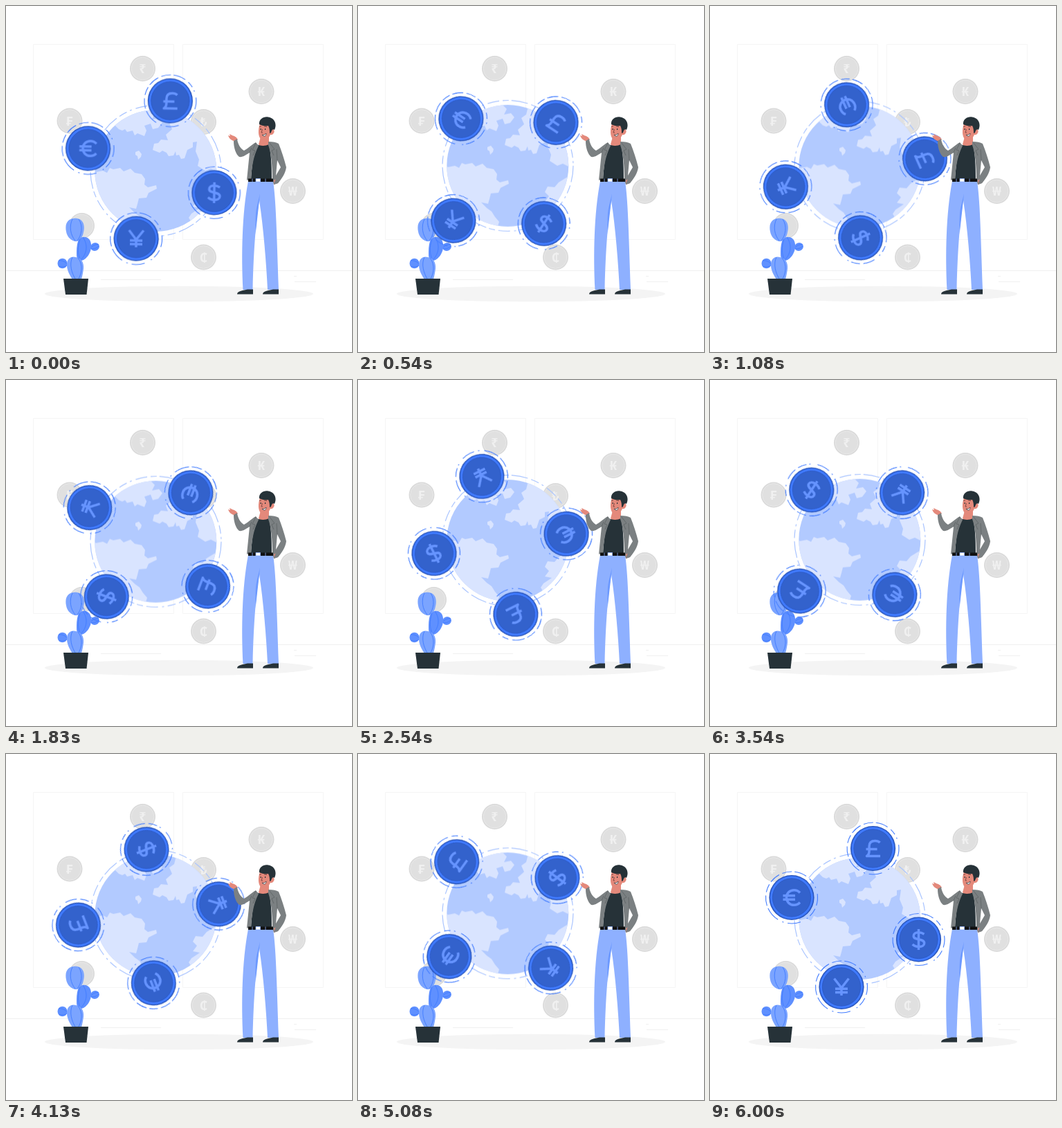
An HTML page without scripts for the animation above (6.04 s loop, 500 by 500 pixels).

```html
<!DOCTYPE html>
<html lang="en">
<head>
<meta charset="utf-8">
<title>World currencies</title>
<style>
  html, body { margin: 0; width: 100%; height: 100%; overflow: hidden; background: #fff; }
  svg { display: block; width: 100%; height: 100%; }
  .orbit { transform-origin: 207.8px 236.6px; animation: orbit 6040ms linear infinite; }
  .globe { animation: bob 6040ms linear infinite; }
  @keyframes orbit {
    0% { transform: rotate(1deg); }
    84.106% { transform: rotate(305.6deg); }
    99.338% { transform: rotate(360deg); }
    100% { transform: rotate(361deg); }
  }
  @keyframes bob {
    0%, 24.834%, 49.669%, 74.503%, 99.338%, 100% { transform: translateY(0); }
    12.417%, 37.252%, 62.086%, 86.921% { transform: translateY(-10px); }
  }
  .room { fill: none; stroke: #f5f5f5; }
  .gray text { font: 700 18px "Noto Sans", "DejaVu Sans", sans-serif; fill: #f0f0f0; text-anchor: middle; }
  .sign { fill: none; stroke: #6694ff; stroke-width: 3.5; stroke-linejoin: round; }
  .ink { fill: #263238; }
  .skin { fill: #e4897b; }
  .cloth { fill: #7b8082; }
  .fold { fill: none; stroke: #5e6465; stroke-width: .8; }
  .vein { fill: none; stroke: #407bff; stroke-width: .9; }
  .pale { fill: #7ba4ff; }
  .deep { fill: #5f90ff; }
</style>
</head>
<body>
<svg viewBox="0 0 500 500" xmlns="http://www.w3.org/2000/svg">
  <defs>
    <clipPath id="disc"><circle cx="216.3" cy="238" r="88"/></clipPath>
    <g id="coin">
      <circle r="32.6" fill="#2855bd"/>
      <circle r="31" fill="#407bff"/>
      <circle r="27.6" fill="#3362cc" stroke="#2c59c4"/>
      <circle r="37.5" fill="none" stroke="#407bff" stroke-width="1.1"
        stroke-dasharray="2 9 17 5 13 4 2 10 19 6 2 7 22 4 15 5 12 4 16 5 14 4 18 6 9 5.6" transform="rotate(-25)"/>
    </g>
    <g id="dull">
      <circle r="18.5" fill="#dadada"/>
      <circle r="16.4" fill="#e0e0e0" stroke="#e9e9e9"/>
    </g>
  </defs>

  <g class="room">
    <path d="M39.5 55.500H242.500V337.500H39.500ZM255.500 55.500H458.500V337.500H255.500Z"/>
    <path d="M0 382.500H500M137 395.500H224M416 390.500H420M417 398.500H448" stroke="#f0f0f0"/>
  </g>
  <ellipse cx="250" cy="416" rx="194" ry="11.300" fill="#f4f4f4"/>

  <g class="gray">
    <g transform="translate(197.500 90.500)"><use href="#dull"/><text y="6.500">₹</text></g>
    <g transform="translate(369 123.500)"><use href="#dull"/><text y="6.500">₭</text></g>
    <g transform="translate(92 166)"><use href="#dull"/><text y="6.500">₣</text></g>
    <g transform="translate(285.500 167.500)"><use href="#dull"/><text y="6.500">₺</text></g>
    <g transform="translate(414.500 267.500)"><use href="#dull"/><text y="6.500">₩</text></g>
    <g transform="translate(285.500 363)"><use href="#dull"/><text y="6.500">₵</text></g>
    <use href="#dull" x="109.500" y="317.500"/>
  </g>

  <g class="globe">
    <circle cx="216.500" cy="238" r="94.500" fill="none" stroke="#a9c4ff" stroke-width="1.200"
      stroke-dasharray="24 5 12 5 3 6 17 5 9 4"/>
    <circle cx="216.300" cy="238" r="88" fill="#b2caff"/>
    <g fill="#d9e4ff" clip-path="url(#disc)">
      <path d="M163 178 168 180 172 178 175 182 183 180 186 187 190 184 195 186 200 188 203 180 200 173 209 170 212 178 220 176 226 168 221 162 211 164 215 156 209 150 190 140 150 165Z"/>
      <path d="M247 148 243 164 236 169 240 178 231 186 234 194 224 193 220 198 214 199 212 208 222 212 226 209 232 212 235 217 242 216 245 210 246 216 250 215 253 221 258 220 262 208 270 204 270 197 276 196 274 210 279 222 277 231 288 238 296 235 310 242V148Z"/>
      <path d="M120 233 130 240 140 238 146 241 150 234 155 236 165 234 170 239 180 235 186 241 196 243 201 250 200 258 205 262 217 259 218 264 206 270 203 277 192 278 190 286 188 293 178 291 186 299 193 304 198 312 204 319 200 332H120Z"/>
      <path d="m187 211 5-2 4 5-1 4-4 4-1-5-3-2Z"/>
      <path d="M310 250 298 257 290 262 284 269 274 268 270 276 276 282 270 290 280 292 268 300 264 306 272 318 312 290Z"/>
    </g>
  </g>

  <g>
    <path class="pale" d="M87 326C84 312 92 305 103 307C113 309 114 319 112 327C110 337 105 341 99 340C93 338 88 333 87 326Z"/>
    <path class="vein" d="M96 308C91 318 93 331 100 339M105 308C112 318 109 332 103 339"/>
    <ellipse class="deep" cx="128.500" cy="348" rx="6.500" ry="5.800" transform="rotate(-20 128.500 348)"/>
    <path class="vein" d="M122 350C126 345 131 344 134 345M122 350C127 352 131 350 134 347"/>
    <path class="deep" d="M104 340C107 332 117 332 121 338C126 347 122 361 112 367C105 370 102 366 102 359C102 352 102 346 104 340Z"/>
    <path class="vein" d="M111 334C119 345 117 358 108 367M107 337C103 348 104 359 107 366"/>
    <ellipse class="deep" cx="81.500" cy="372" rx="7" ry="7.300"/>
    <path class="vein" d="M76 368C81 367 87 370 89 374M77 376C81 378 86 377 89 374"/>
    <path class="pale" d="M88 374C88 365 94 361 101 363C109 364 113 371 112 380C111 387 110 391 109 395H96C92 389 88 382 88 374Z"/>
    <path class="vein" d="M96 363C91 373 95 386 100 394M104 364C112 374 109 387 105 394"/>
    <path class="ink" d="M83 394H119L116.500 417H86Z"/>
  </g>

  <g class="orbit">
    <g transform="translate(235.500 136.500)"><use href="#coin"/>
      <path class="sign" d="M10-8.500C8-10.500 5.500-11 3-11C-3-11-5.500-8-5.500-3V4C-5.500 7-6.500 9.500-9 11H10.500M-10 1H6"/></g>
    <g transform="translate(118 207.500)"><use href="#coin"/>
      <path class="sign" d="M12-7C9.500-9.700 6.800-10.800 3.500-10.800C-3-10.800-7.500-6-7.500 0S-3 10.800 3.500 10.800C6.800 10.800 9.500 9.700 12 7M-12.500-2.800H5M-12.500 2.800H5"/></g>
    <g transform="translate(190 336.500)"><use href="#coin"/>
      <path class="sign" d="M-10.500-12 0 1.500 10.500-12M0 1.500V12.500M-9 2.800H9M-9 8H9"/></g>
    <g transform="translate(301.500 268)"><use href="#coin"/>
      <path class="sign" d="M8-7.800C5.500-9.300 3-10.200 0-10.200C-4.500-10.200-7.300-8-7.300-5C-7.300 2 8.200-2 8.200 5.200C8.200 8.500 5 10.500.5 10.500C-3 10.500-6.500 9.300-8.800 7M0-15V15"/></g>
  </g>

  <g>
    <path d="M350 253H386C390 280 391 320 394 410H378C376 370 372 320 366 281C362 305 358 345 356.500 410H342.500C340 360 341 300 350 253Z" fill="#8eb0ff"/>
    <path d="M367 271C365 281 362 289 361 300C360 310 361 320 360.500 330L366 281Z" fill="#6c99ff"/>
    <path class="ink" d="M334 416.500C334 411.500 344 411 349 409.500H357V416.500ZM371 416.500C371 411.500 381 411 386 409.500H394V416.500Z"/>
    <path class="skin" d="M368 189 380 185V200C377 205 369 205 365 200Z"/>
    <path class="ink" d="M362 200C357 215 355 235 354 251H384C384 230 383 212 380 200C374 203 367 202 362 200Z"/>
    <path class="skin" d="M335 193C333 189 330 188 327 187L323 185L324 188L321 187C322 191 325 194 330 195.500Z"/>
    <path class="cloth" d="M361 197C353 202 348 207 344 209C339 206 335 200 334 192L329 195C329 205 332 214 337 218C342 219 347 215 352 212L348 251.500H354C355 234 357 218 365 202Z"/>
    <path class="cloth" fill-rule="evenodd" d="M379 196C386 196 391 197 394 199C398 209 402 221 405 233C404 242 398 250 393 256L387 258L385 251.500C385 230 383 212 379 201ZM392 223 390 245 397 233Z"/>
    <path class="fold" d="M361 198 356 208 360 209 357 216M381 198 388 207 384 209 387 216M352 212 355 205M392 223 391 207"/>
    <path class="skin" d="M387 252 392 249 394 254 388 258Z"/>
    <path class="cloth" d="M391 246 397 250 393 256 387 258Z"/>
    <path d="M350 249.500H386V254H350Z" fill="#111"/>
    <path d="M361 249.500H367.500V254H361ZM356 249.500V254M375 249.500V254" fill="#fff" stroke="#8eb0ff" stroke-width=".8"/>
    <path class="skin" d="M367 170C364 179 364 189 369 193C374 196 380 191 382 186C386 187 389 182 387 179L381 170Z"/>
    <path class="ink" d="M366 171C365 164 372 159 379 160.500C388 162 392 170 388 179C386 177 384 179 383 183L381 184C381 180 381 177 379 173C375 174 370 173 366 171Z"/>
    <path d="M370 186C372 187 374 186 376 184C376 188 373 190 370 186Z" fill="#fff" stroke="#263238" stroke-width=".7"/>
    <path class="ink" d="M367.500 177h1.200v2h-1.200ZM374 177h1.200v2h-1.200Z"/>
    <path d="M366 174.500 369 174M373 174 377 174.500M370.500 178 369 183H371" fill="none" stroke="#6d3c38" stroke-width=".8"/>
  </g>
</svg>
</body>
</html>
```
